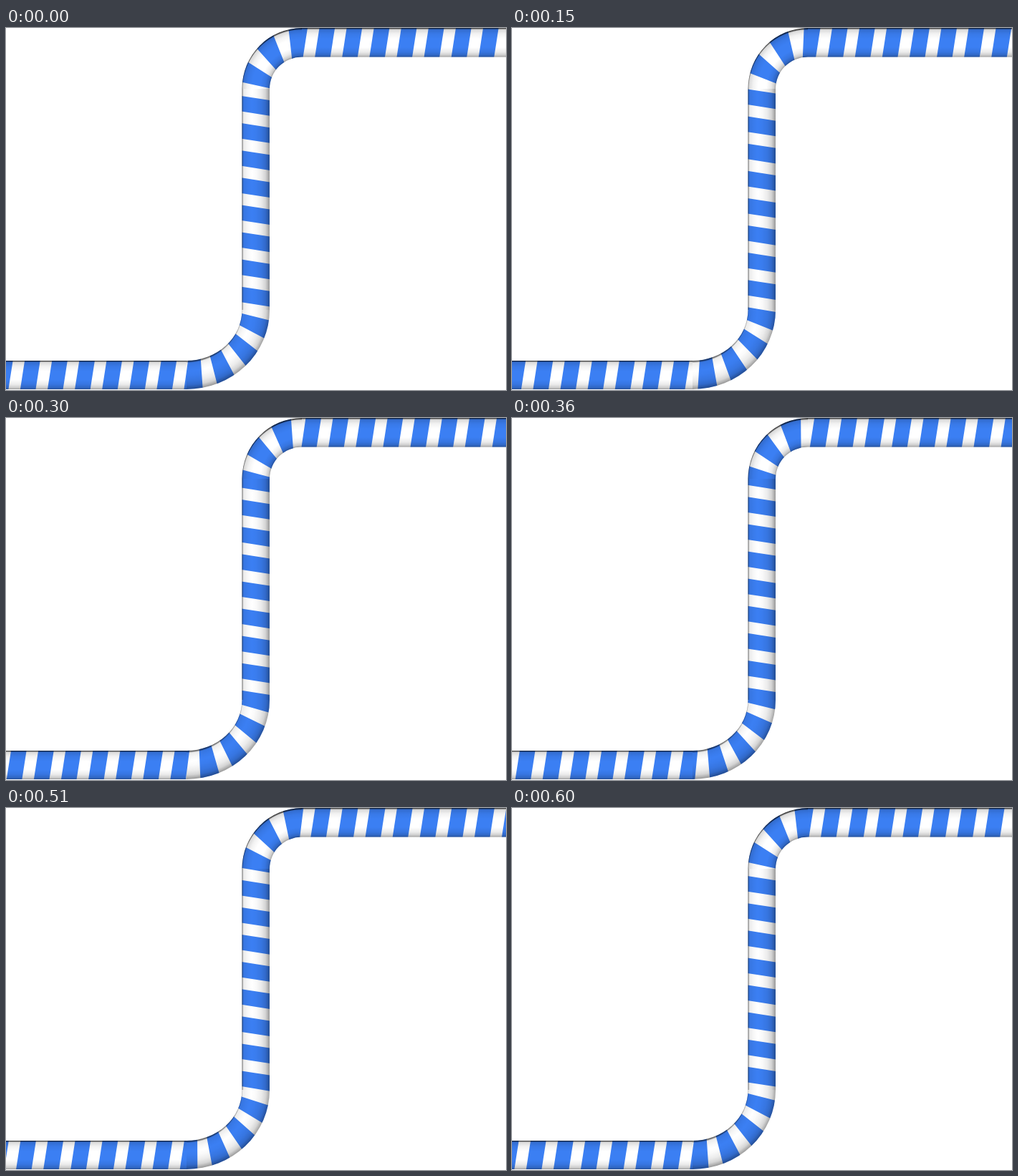
An HTML page with a canvas that plays this animation: 698 px wide and 506 px high, repeating every 630 ms.

```html
<!DOCTYPE html>
<html lang="en">
<head>
<meta charset="utf-8">
<title>Striped pipe</title>
<style>
  html, body { margin: 0; width: 100%; height: 100%; overflow: hidden; background: #fff; }
  canvas { display: block; }
</style>
</head>
<body>
<canvas id="stage" width="698" height="506"></canvas>
<script>
const ctx = document.getElementById('stage').getContext('2d');

const LOOP = 630, STEP = 30, SPEED = 1.9;
const PERIOD = 38.1, BLUE = 21.6, START = 23, SLANT = 0.155, REACH = 23;

// Bend centres, centre-line radii, and the radius that spaces the stripes
const low = { x: 252, y: 394, rx: 96.5, ry: 91, pitch: 91.9 };
const high = { x: 413, y: 85, rx: 64.5, ry: 64.5, pitch: 61.4 };

// Distance along the pipe at the end of each section
const s1 = low.x;
const s2 = s1 + low.pitch * Math.PI / 2;
const s3 = s2 + low.y - high.y;
const s4 = s3 + high.pitch * Math.PI / 2;

const outline = new Path2D(
  'M0 465H252A77.5 71 0 0 0 329.5 394V85A83.5 85 0 0 1 413 0H698' +
  'V40.5H413A45 44.5 0 0 0 368 85V394A116 111 0 0 1 252 505H0Z');

// Point at distance s along the pipe, offset o to the right of travel
function at(s, o) {
  if (s < s1) return [s, low.y + low.ry + o];
  if (s < s2) {
    const a = (s - s1) / low.pitch;
    return [low.x + (low.rx + o) * Math.sin(a), low.y + (low.ry + o) * Math.cos(a)];
  }
  if (s < s3) return [low.x + low.rx + o, low.y - (s - s2)];
  if (s < s4) {
    const a = (s - s3) / high.pitch;
    return [high.x - (high.rx - o) * Math.cos(a), high.y - (high.ry - o) * Math.sin(a)];
  }
  return [high.x + s - s4, high.y - high.ry + o];
}

// Shadow strength across the pipe, from its left side to its right
const level = [[0, .8], [.025, .6], [.055, .15], [.2, .05], [.38, 0],
               [.66, 0], [.83, .08], [.94, .2], [1, .38]];
const upright = [[0, .6], [.025, .35], [.055, .08], [.2, .03], [.35, 0],
                 [.5, .02], [.7, .08], [.85, .17], [1, .4]];

function shade(gradient, stops) {
  for (const [p, a] of stops) gradient.addColorStop(p, `rgba(0,0,0,${a})`);
  return gradient;
}

const linear = (stops, ...p) => shade(ctx.createLinearGradient(...p), stops);
const radial = (stops, x, y, from, to) =>
  shade(ctx.createRadialGradient(x, y, from, x, y, to), stops);

// The lower bend is wider than tall: its gradient is drawn in stretched space
const stretch = low.rx / low.ry;
const shadows = [
  [1, linear(level, 0, 465, 0, 505), 0, 464, 252, 42],
  [stretch, radial(upright, low.x / stretch, low.y, 72, 110.5), 252 / stretch, 394, 114, 112],
  [1, linear(upright, 329.5, 0, 368, 0), 328, 85, 42, 309],
  [1, radial(level, high.x, high.y, 84.3, 44.7), 328, 0, 85, 85],
  [1, linear(level, 0, 0, 0, 40.5), 413, 0, 285, 42]
];

function stripe(s) {
  const parts = 8;
  ctx.beginPath();
  for (const side of [-1, 1]) {
    for (let i = 0; i <= parts; i++) {
      const k = side < 0 ? i : parts - i;
      const o = side * REACH;
      ctx.lineTo(...at(s + BLUE * k / parts - o * SLANT, o));
    }
  }
  ctx.fill();
}

function draw(now) {
  const t = now % LOOP;
  const slot = t < 2 * STEP ? 0 : Math.floor(t / STEP);
  ctx.fillStyle = '#fff';
  ctx.fillRect(0, 0, 698, 506);
  ctx.save();
  ctx.clip(outline);
  ctx.fillStyle = '#3b7ff3';
  const first = START + slot * SPEED - 3 * PERIOD;
  for (let s = first; s < s4 + 310; s += PERIOD) stripe(s);
  for (const [scale, fill, ...box] of shadows) {
    ctx.save();
    ctx.scale(scale, 1);
    ctx.fillStyle = fill;
    ctx.fillRect(...box);
    ctx.restore();
  }
  ctx.restore();
}

const begin = performance.now();
function tick() {
  draw(performance.now() - begin);
  requestAnimationFrame(tick);
}
tick();
</script>
</body>
</html>
```
